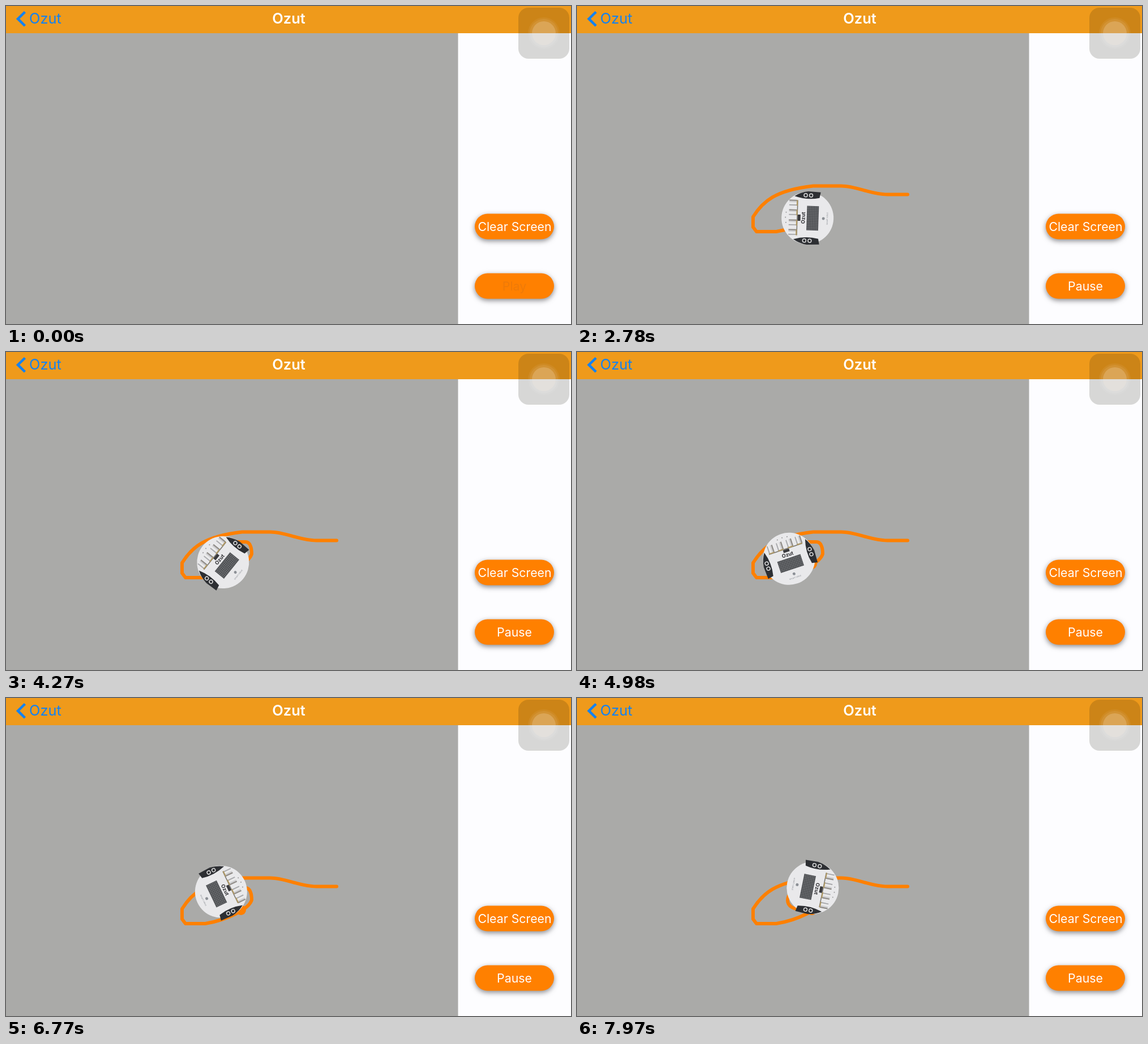
Animation of 998 by 561 pixels, one loop 8 s. Source, as an HTML page:

```html
<!DOCTYPE html>
<html lang="en">
<head>
<meta charset="utf-8">
<style>
html, body { margin: 0; width: 100%; height: 100%; overflow: hidden; }
svg { display: block; width: 998px; height: 561px; font-family: Inter, Roboto, sans-serif; }
.btn rect { fill: #ff8000; filter: drop-shadow(0 3px 5px rgba(40, 40, 45, .55)); }
.btn text { fill: #fff; font-size: 21.3px; text-anchor: middle; }
</style>
</head>
<body>
<svg viewBox="0 0 998 561">
  <defs>
    <pattern id="leds" width="3" height="3" patternUnits="userSpaceOnUse">
      <rect width="3" height="3" fill="#46484b"/>
      <circle cx="1.5" cy="1.5" r="1" fill="#85878a"/>
    </pattern>
    <linearGradient id="metal">
      <stop offset="0" stop-color="#8b8c90"/>
      <stop offset=".3" stop-color="#f4f4f4"/>
      <stop offset=".7" stop-color="#cfcfd2"/>
      <stop offset="1" stop-color="#6f6a62"/>
    </linearGradient>
    <g id="wheel">
      <path d="M38-24Q31-2 36 20L46 22L47 0Q45-14 38-24Z" fill="#2d2f33"/>
      <g fill="#2d2f33" stroke="#dcdcdc" stroke-width="1.5">
        <circle cx="40" cy="-4.5" r="3"/>
        <circle cx="40" cy="5" r="3"/>
      </g>
    </g>
    <g id="post">
      <rect x="-4.5" y="-33" width="10" height="14" fill="url(#metal)"/>
      <rect x="-5" y="-20" width="10" height="2" fill="#b29a63"/>
    </g>
  </defs>

  <rect width="998" height="561" fill="#fdfdff"/>
  <rect y="48" width="798.5" height="513" fill="#aaaaa8"/>
  <rect width="998" height="48" fill="#ef9a1b"/>
  <path d="M33.5 10.5L21 22.7L33.5 35" fill="none" stroke="#1482f0" stroke-width="4.5"/>
  <text x="41" y="31" font-size="25.4" fill="#1482f0">Ozut</text>
  <text x="499.5" y="31" font-size="25.4" font-weight="600" fill="#fff" text-anchor="middle">Ozut</text>

  <g class="btn">
    <rect x="828" y="366.500" width="140" height="45" rx="22.500"/>
    <text x="898.500" y="397">Clear Screen</text>
    <rect x="828" y="471.500" width="140" height="45" rx="22.500"/>
    <text id="label" x="898" y="502">Play</text>
  </g>

  <g id="drawing">
    <path id="line" fill="none" stroke="#ff8000" stroke-width="6" stroke-linecap="round" stroke-linejoin="round"
      d="M415 374H403C382 374 372 367 372 357S382 335 400 335H423C431 335 434 345 434 356
         C430 372 390 392 352 398H317L311 390V372C328 345 350 325 417 317.5H467C493 317.5 520 332.5 548 332.5H584"/>
    <circle cx="415" cy="374" r="9" fill="#ff8000"/>
  </g>

  <g id="robot">
    <circle r="46" fill="#e9e9eb"/>
    <use href="#wheel"/>
    <use href="#wheel" transform="scale(-1 1)"/>
    <rect x="-31" y="-19" width="62" height="1.500" fill="#77746d"/>
    <use href="#post" x="-26"/>
    <use href="#post" x="-9"/>
    <use href="#post" x="9"/>
    <use href="#post" x="26"/>
    <path d="M-9-38h.1M0-39h.1M9-38h.1" stroke="#9a9a9c" stroke-width="2" stroke-linecap="round"/>
    <rect x="-5.500" y="-17.500" width="11" height="5" fill="#3a3a3d"/>
    <text y="-4.500" font-size="9" font-weight="700" fill="#303034" text-anchor="middle">Ozut</text>
    <rect x="-21.500" y="-1.500" width="43" height="21" fill="url(#leds)"/>
    <circle cy="28" r="2.500" fill="#8c9096"/>
    <text y="36" font-size="4" fill="#8c9096" text-anchor="middle">smart robot</text>
  </g>

  <rect x="905" y="3" width="90" height="90" rx="18" fill="rgb(20,20,0)" fill-opacity=".16"/>
  <g fill="#fff">
    <circle cx="950" cy="48" r="28" fill-opacity=".05"/>
    <circle cx="950" cy="48" r="25" fill-opacity=".07"/>
    <circle cx="950" cy="48" r="21" fill="#ffeede" fill-opacity=".2"/>
  </g>
</svg>
<script>
const LOOP = 8000, DRAW = 970, READY = 1800, START = 2320;
const el = id => document.getElementById(id);
const line = el('line'), drawing = el('drawing'), robot = el('robot'), label = el('label');
const total = line.getTotalLength();

// time, distance along the line, heading (0 = up)
const cues = [
  [START, 0, -90], [3530, 20.5, -85], [4980, 43, -18.6],
  [6000, 52, 43.5], [6770, 69, 64.4], [7970, 107, 101.5]
];

function cueAt(t) {
  const next = cues.findIndex((c, i) => i && (t < c[0] || i === cues.length - 1));
  const a = cues[next - 1], b = cues[next];
  const k = (t - a[0]) / (b[0] - a[0]);
  return a.map((v, n) => v + (b[n] - v) * k);
}

function render(t) {
  // The finger speeds up as it draws.
  const drawn = Math.min(1, Math.max(0, (t - DRAW) / (READY - DRAW))) ** 1.4;
  drawing.style.display = t < DRAW ? 'none' : '';
  line.setAttribute('stroke-dasharray', `${drawn * total} ${total + 1}`);

  const running = t >= START;
  label.textContent = running ? 'Pause' : 'Play';
  label.style.fill = t < READY ? '#ee7a08' : '#fff';

  robot.style.display = running ? '' : 'none';
  if (running) {
    const [, distance, heading] = cueAt(t);
    const p = line.getPointAtLength(distance);
    robot.setAttribute('transform', `translate(${p.x} ${p.y}) rotate(${heading})`);
  }
}

function tick() {
  render(performance.now() % LOOP);
  requestAnimationFrame(tick);
}
tick();
</script>
</body>
</html>
```
